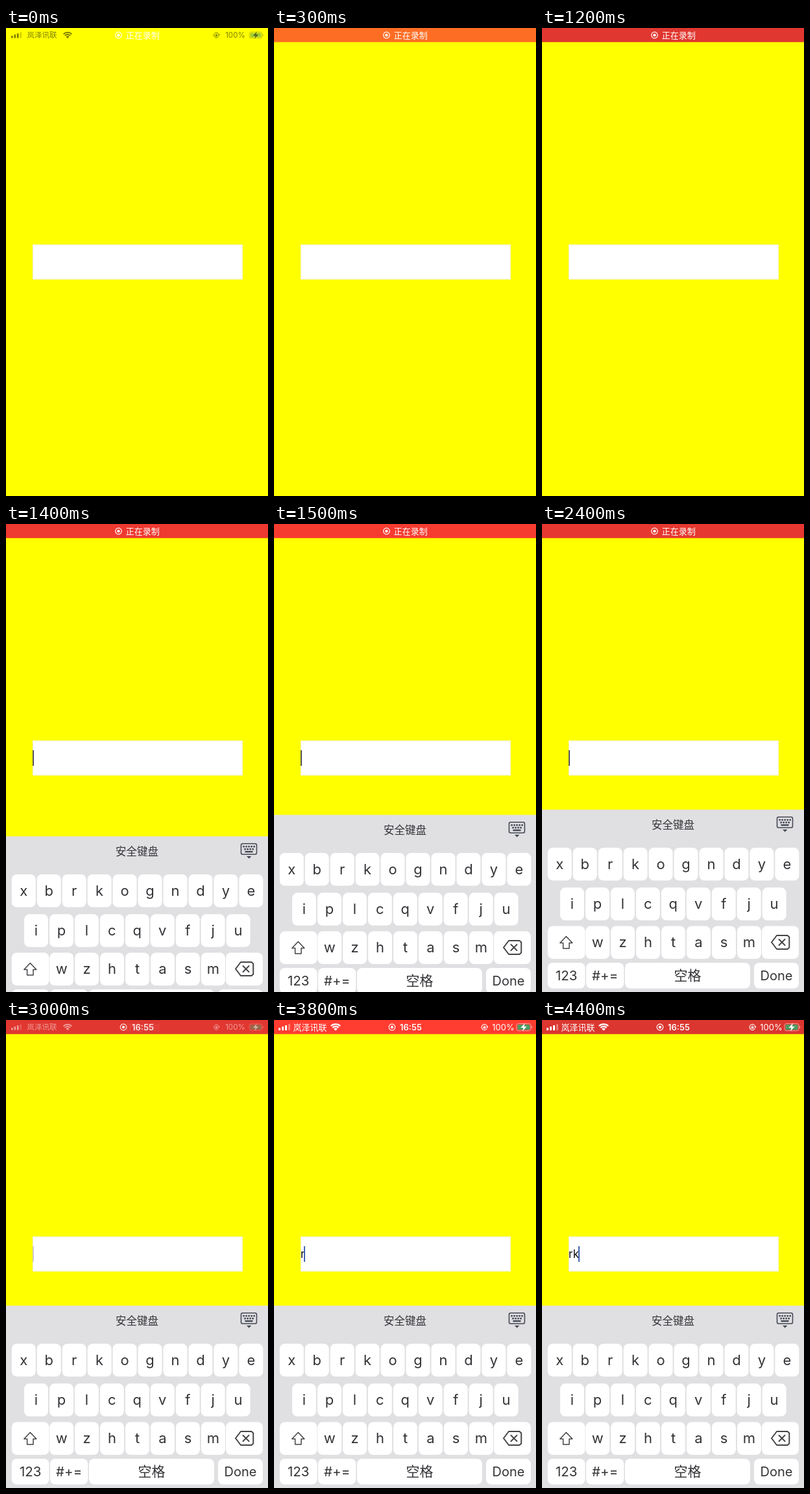
Recreate the animation shown at these times as an HTML page with a canvas. Size 404 by 720 pixels, loop 4500 ms.

```html
<!DOCTYPE html>
<html lang="zh">
<head>
<meta charset="utf-8">
<style>
html, body { margin: 0; width: 404px; height: 720px; overflow: hidden; background: #ff0; }
canvas { display: block; }
</style>
</head>
<body>
<canvas id="stage" width="404" height="720"></canvas>
<script>
const ctx = document.getElementById('stage').getContext('2d');
const LOOP = 4500, STEP = 100;
const LATIN = 'Inter, Roboto, sans-serif';
const CJK = '"Noto Sans CJK SC", "Noto Sans CJK", sans-serif';
const KEY_INK = '#343438';

const ramp = (t, from, to) => Math.min(1, Math.max(0, (t - from) / (to - from)));

function text(str, x, y, size, font, color, align = 'center', weight = 400) {
  ctx.font = `${weight} ${size}px ${font}`;
  ctx.textAlign = align;
  ctx.fillStyle = color;
  ctx.fillText(str, x, y);
}

function box(x, y, w, h, r) {
  ctx.beginPath();
  ctx.roundRect(x, y, w, h, r);
}

function poly(points, closed = true) {
  ctx.beginPath();
  points.forEach(([x, y]) => ctx.lineTo(x, y));
  if (closed) ctx.closePath();
}

function disc(x, y, r) {
  ctx.beginPath();
  ctx.arc(x, y, r, 0, 7);
}

function withAlpha(alpha, draw) {
  if (alpha <= 0) return;
  ctx.save();
  ctx.globalAlpha = alpha;
  draw();
  ctx.restore();
}

// ---- status bar ----

function recordMark(x) {
  ctx.strokeStyle = ctx.fillStyle = '#fff';
  ctx.lineWidth = 1.2;
  disc(x, 11, 4.8);
  ctx.stroke();
  disc(x, 11, 2.2);
  ctx.fill();
}

// Each item is drawn around its own centre at (x, 11).
const statusItems = [
  [16, (ink, alpha) => {
    for (let i = 0; i < 4; i++) {
      ctx.globalAlpha = alpha * (i < 3 ? 1 : 0.35);
      box(-9 + i * 5, 1 - i * 2, 3, 4 + i * 2, 0.8);
      ctx.fill();
    }
  }],
  [55.5, ink => text('岚泽讯联', 0, 4.7, 13, CJK, ink)],
  [95, () => {
    const wedge = r => ctx.arc(0, 5.5, r, -Math.PI * 0.75, -Math.PI * 0.25);
    ctx.lineWidth = 2.3;
    for (const r of [10.2, 6.6]) {
      ctx.beginPath();
      wedge(r);
      ctx.stroke();
    }
    ctx.beginPath();
    ctx.moveTo(0, 5.5);
    wedge(4);
    ctx.fill();
  }],
  [324.5, () => {
    ctx.lineWidth = 1.1;
    ctx.beginPath();
    ctx.arc(0, 0, 4.4, 0.5, 6.1);
    ctx.stroke();
    poly([[2.8, -1], [6, -1], [4.4, 1.4]]);
    ctx.fill();
    ctx.fillRect(-1.9, -0.6, 3.8, 2.8);
    ctx.lineWidth = 0.8;
    ctx.beginPath();
    ctx.arc(0, -0.8, 1.2, Math.PI, 0);
    ctx.stroke();
  }],
  [353.5, ink => text('100%', 0, 4.6, 13, LATIN, ink)],
  [385.5, (ink, alpha) => {
    ctx.globalAlpha = alpha * 0.5;
    ctx.lineWidth = 1;
    box(-11.5, -5.5, 22, 11, 3);
    ctx.stroke();
    ctx.fillRect(11.3, -1.8, 1.3, 3.6);
    ctx.globalAlpha = alpha;
    ctx.fillStyle = '#4f9a62';
    box(-10, -4, 19, 8, 1.6);
    ctx.fill();
    ctx.fillStyle = ink;
    poly([[1.5, -6.5], [-5, 1], [-1, 1], [-2.5, 6.5], [4, -1], [0, -1]]);
    ctx.fill();
  }]
];

function sideItems(ink, alpha) {
  if (alpha <= 0) return;
  const scale = 0.78 + 0.22 * alpha;
  for (const [x, draw] of statusItems) {
    ctx.save();
    ctx.translate(x, 11);
    ctx.scale(scale, scale);
    ctx.globalAlpha = alpha;
    ctx.fillStyle = ctx.strokeStyle = ink;
    draw(ink, alpha);
    ctx.restore();
  }
}

function statusBar(t) {
  const red = Math.min(255, 238 + 22 * Math.cos(2 * Math.PI * (t - 1850) / 1800));
  const green = 54 + 6 * (red - 216) / 39;
  withAlpha(ramp(t, 0, 400), () => {
    ctx.fillStyle = `rgb(${red}, ${green}, 48)`;
    ctx.fillRect(0, 0, 404, 21.7);
  });
  sideItems('#000', 1 - ramp(t, -200, 200));
  sideItems('#fff', ramp(t, 2850, 3150));

  const clock = ramp(t, 2850, 3020);
  withAlpha(1 - clock, () => {
    if (!clock) recordMark(173.5);
    text('正在录制', 184.7, 15.8, 13, CJK, '#fff', 'left');
  });
  withAlpha(clock, () => {
    recordMark(182 - (1 - clock) * 8);
    text('16:55', 211, 15.7, 13, LATIN, '#fff', 'center', 600);
  });
}

// ---- input field ----

const typing = [[1300, '', 42], [3700, 'r', 47], [4200, 'rk', 57]];

function inputField(t) {
  ctx.fillStyle = '#fff';
  ctx.fillRect(41, 333, 324, 54);
  ctx.strokeStyle = '#f1f1e4';
  ctx.lineWidth = 1;
  ctx.strokeRect(41.5, 333.5, 323, 53);

  const entry = typing.filter(([start]) => t >= start).pop();
  if (!entry) return;
  const [start, value, caretX] = entry;
  text(value, 41, 366, 17, LATIN, '#111', 'left');
  const phase = (t - start) % 1000;
  withAlpha(1 - ramp(phase, 500, 770) + ramp(phase, 850, 1000), () => {
    ctx.fillStyle = value ? '#4163b0' : '#555558';
    ctx.fillRect(caretX - 1, 348, 2, 24);
  });
}

// ---- keyboard ----

function key(x, y, w, h, label = '', size = 22, font = LATIN, fill = '#fff') {
  ctx.fillStyle = fill;
  box(x, y, w, h, 8);
  ctx.fill();
  text(label, x + w / 2, y + h / 2 + size * 0.34, size, font, KEY_INK);
}

function keyRow(letters, x, y, pressed) {
  [...letters].forEach((c, i) =>
    key(x + i * 38.95, y, 37, 50.5, c, 22, LATIN, c === pressed ? '#d2d1d5' : '#fff'));
}

function hideIcon() {
  ctx.strokeStyle = ctx.fillStyle = '#454a55';
  ctx.lineWidth = 1.6;
  box(362.5, 450.8, 24, 16.4, 2.5);
  ctx.stroke();
  for (let i = 0; i < 5; i++) ctx.fillRect(365.3 + i * 4, 454, 2.6, 2.5);
  for (let i = 0; i < 4; i++) ctx.fillRect(367.3 + i * 4, 458, 2.6, 2.5);
  ctx.fillRect(368.5, 462, 12, 2.4);
  poly([[371, 470], [378.4, 470], [374.7, 473.8]]);
  ctx.fill();
}

function shiftIcon() {
  ctx.lineWidth = 1.5;
  poly([[37.3, 634.5], [46.8, 644.5], [42, 644.5], [42, 653], [32.6, 653], [32.6, 644.5], [27.8, 644.5]]);
  ctx.stroke();
}

function deleteIcon() {
  ctx.lineWidth = 2;
  poly([[354, 643.5], [362, 633], [378.5, 633], [381.3, 635.5], [381.3, 651.5], [378.5, 654], [362, 654]]);
  ctx.stroke();
  for (const d of [-4.5, 4.5]) {
    poly([[370 - d, 639], [370 + d, 648]], false);
    ctx.stroke();
  }
}

function keyboard(t) {
  const x = 20 * (t - 1230) / 1000;
  if (x <= 0) return;
  const pressed = t === 3700 ? 'r' : t === 4100 ? 'k' : '';
  ctx.save();
  ctx.translate(0, Math.round(281 * (1 + x) * Math.exp(-x)));
  ctx.fillStyle = '#e0dfe2';
  ctx.fillRect(0, 439.5, 404, 281);
  text('安全键盘', 202, 469.3, 16.5, CJK, KEY_INK);
  hideIcon();
  keyRow('xbrkogndye', 8.8, 498, pressed);
  keyRow('iplcqvfju', 28, 559.3);
  keyRow('wzhtasm', 67.2, 618.5);
  key(8.8, 618.5, 57.7, 50.5);
  key(339, 618.5, 57, 50.5);
  ctx.strokeStyle = '#444448';
  ctx.lineJoin = ctx.lineCap = 'round';
  shiftIcon();
  deleteIcon();
  key(8.8, 675, 57.7, 39.5, '123', 20.5);
  key(68, 675, 58.3, 39.5, '#+=', 20.5);
  key(128, 675, 193, 39.5, '空格', 21, CJK);
  key(327, 675, 69, 39.5, 'Done', 20);
  ctx.restore();
}

function frame(now) {
  const t = Math.floor(now % LOOP / STEP) * STEP;
  ctx.fillStyle = '#ff0';
  ctx.fillRect(0, 0, 404, 720);
  statusBar(t);
  inputField(t);
  keyboard(t);
  requestAnimationFrame(frame);
}
requestAnimationFrame(frame);
</script>
</body>
</html>
```
